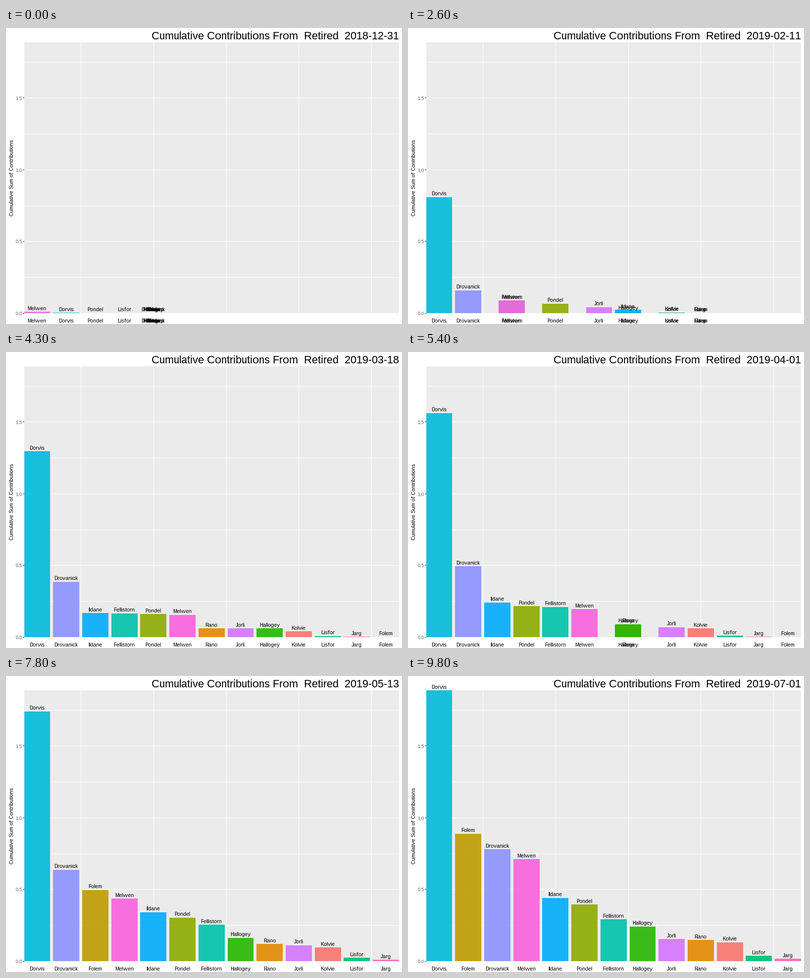
Write a matplotlib script that moves like this. It is 800x600 px and loops after 10 s.

```python
import numpy as np
import matplotlib.pyplot as plt
from matplotlib.animation import FuncAnimation
from matplotlib.patches import Rectangle

# Full hinting without kerning gives crisp small labels
plt.rcParams.update({
    "font.family": "Liberation Sans",
    "text.hinting": "default",
    "text.hinting_factor": 1,
    "text.kerning_factor": 6,
})
PX = 0.72                      # points per pixel at 100 dpi
LEFT, RIGHT, TOP, BASE = 37, 794, 29, 578
SLOT, FIRST = 58.71, 63.05     # rank spacing and centre of rank 1
GRID = 72.77                   # pixels per quarter unit
FRAMES, WEEKS = 100, 27
MARKS = (7, 14, 26)            # weeks at which heights are given
SURGE = 0.65                   # below 1: fast growth right after a launch

fig = plt.figure(figsize=(8, 6), dpi=100, facecolor="white")
ax = fig.add_axes([0, 0, 1, 1])
ax.set_xlim(0, 800)
ax.set_ylim(600, 0)
ax.axis("off")


def block(x, y, w, h, color, **kw):
    rect = Rectangle((x, y), w, h, facecolor=color, linewidth=0,
                     antialiased=False, **kw)
    return ax.add_patch(rect)


def label(x, y, text, size=11, **kw):
    kw.setdefault("ha", "center")
    kw.setdefault("va", "baseline")
    return ax.text(x, y, text, fontsize=size * PX, **kw)


def centre(rank):
    return FIRST + SLOT * (rank - 1)


def hue(degrees, chroma=100, light=65):
    """Polar CIE-LUV colour as clipped sRGB."""
    angle = np.radians(degrees)
    u = chroma * np.cos(angle) / (13 * light) + 0.19784
    v = chroma * np.sin(angle) / (13 * light) + 0.46834
    y = ((light + 16) / 116) ** 3
    x = 9 * y * u / (4 * v)
    z = 3 * y / v - 5 * y - x / 3
    rgb = np.clip([3.2405 * x - 1.5372 * y - 0.4985 * z,
                   -0.9693 * x + 1.8760 * y + 0.0416 * z,
                   0.0556 * x - 0.2040 * y + 1.0573 * z], 0, 1)
    return np.where(rgb > 0.00304, 1.055 * rgb ** (1 / 2.4) - 0.055,
                    12.92 * rgb)


def growth(launch, *heights, opening=0):
    """A surge from launch to the first mark, then straight lines."""
    weeks = np.arange(WEEKS)
    marks = MARKS[-len(heights):]
    x = np.clip((weeks - launch) / (marks[0] - launch), 0, 1)
    surge = opening + (heights[0] - opening) * x ** SURGE
    return surge + np.interp(weeks, marks, heights) - heights[0]


# Panel, grid and axis
block(LEFT, TOP, RIGHT - LEFT, BASE - TOP, "#EBEBEB", zorder=0)
for k in range(1, 8):
    block(LEFT, round(BASE - GRID * k), RIGHT - LEFT, 1, "white", zorder=0.5)
for k in range(1, 6):
    block(round(centre(2.5 * k)), TOP, 1, BASE - TOP, "white", zorder=0.5)
for k in range(4):
    y = round(BASE - 2 * GRID * k)
    block(LEFT - 3, y, 3, 1, "#333333", zorder=0.5)
    label(32.5, y + 4.5, f"{k / 2:.1f}", 9, ha="right", color="#4D4D4D")
label(12, 303.5, "Cumulative Sum of Contributions", rotation=90, va="center")
title = label(794, 23, "", 22, ha="right")

# Bar heights in pixels
runners = {
    "Kolvie": growth(6, 2.5, 19, 38),
    "Rano": growth(8, 27.8, 43),
    "Folem": growth(15, 258),
    "Pondel": growth(3, 21, 66, 115, opening=0.2),
    "Hallogey": growth(3, 3.5, 28, 70),
    "Lisfor": growth(0, 1.1, 3, 11, opening=0.1),
    "Fellistorn": growth(2, 27.2, 64, 85),
    "Dorvis": growth(2, 252, 470, 549, opening=1),
    "Ildane": growth(6, 14, 74.5, 128),
    "Drovanick": growth(5.5, 62, 150, 227),
    "Jorli": growth(1, 13, 21, 45),
    "Melwen": growth(0, 26.9, 59, 207, opening=3),
    "Jarg": growth(7, 1, 5),
}
heights = np.array(list(runners.values()))
# Tied bars share the best rank
ranks = 1 + (heights[None, :, :] > heights[:, None, :]).sum(axis=1)

parts = []
for i, name in enumerate(runners):
    color = hue(15 + 360 * i / len(runners))
    parts.append((block(0, BASE, 1, 0, color, alpha=0.9, zorder=2),
                  label(0, 0, name, zorder=3),
                  label(0, 597, name, zorder=3)))

# Frame at which each week comes to rest, and the length of the move into it
settle = [0] + [4 * k - 1 for k in range(1, 22)] + list(range(86, FRAMES, 3))
settle[8] += 1
span = [3 if k in (1, 8, 9) else 2 for k in range(WEEKS)]


def progress(frame):
    week = int(np.searchsorted(settle, frame, side="right")) - 1
    if week == WEEKS - 1:
        return week, week, 0.0
    left = settle[week + 1] - frame
    return week, week + 1, max(0.0, 1 - left / span[week + 1])


def draw(frame):
    a, b, t = progress(frame)
    day = np.datetime64("2018-12-31") + 7 * (b if t > 0.5 else a)
    title.set_text(f"Cumulative Contributions From  Retired  {day}")
    now_x = centre((1 - t) * ranks[:, a] + t * ranks[:, b])
    now_height = (1 - t) * heights[:, a] + t * heights[:, b]
    for (bar, top, foot), x, height in zip(parts, now_x, now_height):
        x0, x1 = round(x - 0.45 * SLOT), round(x + 0.45 * SLOT)
        h = round(height)
        bar.set_bounds(x0, BASE - h, x1 - x0, h)
        top.set_position((x - 0.4, BASE - height - 3.5))
        foot.set_x(x - 0.4)
    return []


anim = FuncAnimation(fig, draw, frames=FRAMES, interval=100,
                     init_func=lambda: draw(0), repeat=True, repeat_delay=0)
plt.show()
```
